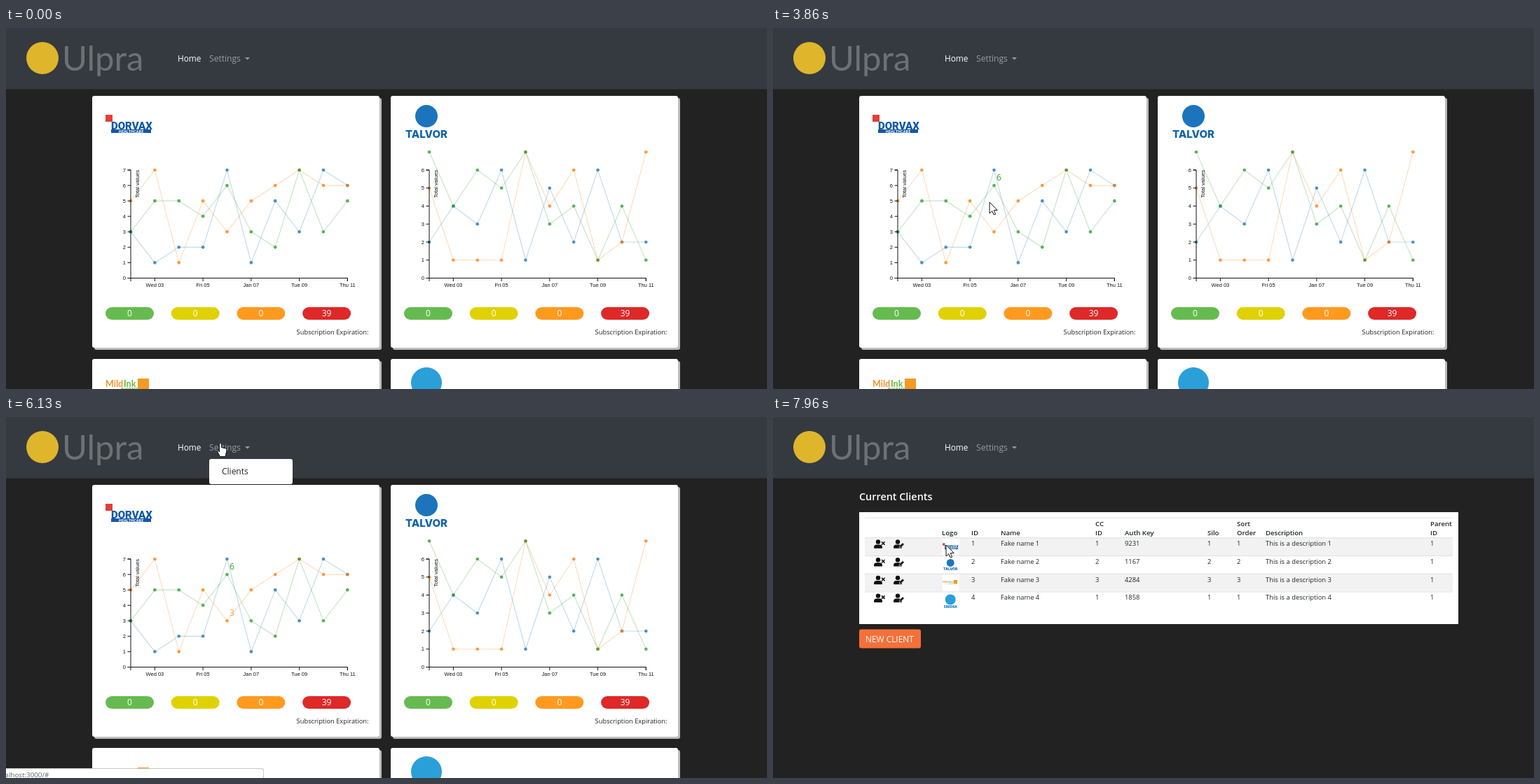
An HTML page with a canvas for the animation above (8 s loop, 1086 by 516 pixels).

```html
<!DOCTYPE html>
<html lang="en">
<head>
<meta charset="utf-8">
<title>Client dashboard</title>
<style>
html, body { margin: 0; width: 100%; height: 100%; overflow: hidden; background: #222; }
canvas { display: block; }
</style>
</head>
<body>
<canvas id="stage" width="1086" height="516"></canvas>
<script>
const ctx = document.getElementById('stage').getContext('2d');
const LOOP = 8000;
const UI = '"Open Sans", sans-serif';
const AXIS = '"Liberation Sans", Arial, sans-serif';
const COLORS = ['#1f77b4', '#ff7f0e', '#2ca02c'];
const DAYS = ['Wed 03', 'Fri 05', 'Jan 07', 'Tue 09', 'Thu 11'];
const PILLS = [['#66bb50', '0'], ['#e0d200', '0'], ['#ff9a1f', '0'], ['#df2828', '39']];

// One digit per day; series order matches COLORS
const CHARTS = [
  { x: 178, max: 7, series: ['3122715376', '5715356766', '3554632735'] },
  { x: 604, max: 6, series: ['2436152622', '5111746127', '7465734141'] }
];
const BASE = 357.5, TOP = 203, STEP = 34.37;

// Start, end, hovered series
const HOVERS = [[900, 1830, 0], [1950, 2700, 2], [2800, 3430, 2], [4400, 5530, 1]];
const VISIBLE = [[60, 900], [3430, 4400], [5530, LOOP]];
const PATH = [
  [60, 842, 2], [860, 321, 202], [3430, 314, 230], [3660, 309, 249], [3860, 309, 249],
  [4400, 314, 286], [5530, 315, 286], [5830, 307, 50], [5930, 306, 37], [6330, 306, 37],
  [6600, 334, 86], [7700, 334, 86], [7960, 247, 183], [LOOP, 247, 183]
];

const within = (t, a, b) => t >= a && t < b;
const bump = (t, a, b) => within(t, a, b) ? Math.sin(Math.PI * (t - a) / (b - a)) : 0;

function rect(x, y, w, h, fill, r = 0) {
  ctx.fillStyle = fill;
  ctx.beginPath();
  ctx.roundRect(x, y, w, h, r);
  ctx.fill();
}

function disc(x, y, r, fill) {
  ctx.fillStyle = fill;
  ctx.beginPath();
  ctx.arc(x, y, r, 0, 7);
  ctx.fill();
}

function text(str, x, y, size, fill, { weight = 400, align = 'left', family = UI } = {}) {
  ctx.font = `${weight} ${size}px ${family}`;
  ctx.textAlign = align;
  ctx.fillStyle = fill;
  ctx.fillText(str, x, y);
}

function poly(points, fill, stroke, width = 1) {
  ctx.beginPath();
  points.forEach(([x, y]) => ctx.lineTo(x, y));
  if (fill) {
    ctx.closePath();
    ctx.fillStyle = fill;
    ctx.fill();
  }
  if (stroke) {
    ctx.strokeStyle = stroke;
    ctx.lineWidth = width;
    ctx.stroke();
  }
}

function at(x, y, scale, draw) {
  ctx.save();
  ctx.translate(x, y);
  ctx.scale(scale, scale);
  draw();
  ctx.restore();
}

// Client logos, each about 66 wide
const LOGOS = [
  () => {
    rect(0, 0, 10, 10, '#e0403a');
    text('DORVAX', 8, 21, 15, '#1259a5', { weight: 900, family: 'Roboto, sans-serif' });
    rect(8, 21, 57, 5, '#1259a5');
    text('HEALTHCARE', 36.5, 25.6, 5.5, '#fff', { align: 'center', weight: 700 });
  },
  () => {
    disc(33, 16, 16, '#1c75bc');
    text('TALVOR', 33, 47, 15, '#0d64ae', { align: 'center', weight: 800, family: 'Inter, sans-serif' });
  },
  () => {
    text('Mild', 0, 13, 12.5, '#f0932b', { weight: 700, family: 'Lato, sans-serif' });
    text('Ink', 26, 13, 12.5, '#6db33f', { weight: 700, family: 'Lato, sans-serif' });
    rect(46, 1, 16, 16, '#f39a24');
    text('BUSINESS', 22, 18, 5, '#6db33f', { weight: 700 });
  },
  () => {
    disc(33, 22, 22, '#2a9fd8');
    text('SIMDRA', 33, 58, 14, '#1c84c6', { align: 'center', weight: 800 });
  }
];

function header() {
  rect(0, 0, 1086, 87.5, '#343a40');
  disc(52, 43, 23, '#dfb52c');
  text('Ulpra', 80, 60.5, 49, '#6d7175', { family: 'Lato, sans-serif' });
  text('Home', 245, 48, 11.8, '#fff', { weight: 500 });
  text('Settings', 290, 48, 12.1, '#999c9f');
  poly([[341, 42], [348, 42], [344.5, 45.5]], '#999c9f');
}

function card(x, y) {
  rect(x + 3, y + 3, 410, 360, '#bcbcbc', 3);
  rect(x, y, 410, 360, '#fff', 3);
}

function chart({ x, max, series }, t, main) {
  const hover = HOVERS.find(([a, b]) => within(t, a, b));
  const px = i => x + i * STEP;
  const py = v => BASE - v * (BASE - TOP) / max;
  const data = series.map(s => [...s].map(Number));

  data.forEach((row, k) => {
    const active = main && hover && hover[2] === k;
    ctx.globalAlpha = active ? 0.85 : hover ? 0.1 : 0.27;
    poly(row.map((v, i) => [px(i), py(v)]), null, COLORS[k], active ? 2 : 1.15);
  });

  ctx.globalAlpha = hover ? 0.25 : 0.78;
  data.forEach((row, k) => row.forEach((v, i) => {
    let r = 2.35;
    if (main && i === 4) {
      if (k === 2) r += 2.2 * bump(t, 1830, 2030);
      if (k === 1) r += 2.2 * bump(t, 4300, 4600);
    }
    disc(px(i), py(v), r, COLORS[k]);
  }));
  ctx.globalAlpha = 1;

  const right = x + 9 * STEP;
  poly([[x - 4.5, TOP], [x, TOP], [x, BASE], [x - 4.5, BASE]], null, '#111');
  poly([[x, BASE + 4.5], [x, BASE], [right, BASE], [right, BASE + 4.5]], null, '#111');
  for (let v = 0; v <= max; v++) {
    poly([[x - 4.5, py(v)], [x, py(v)]], null, '#111');
    text(v, x - 7, py(v) + 2.7, 7.5, '#111', { align: 'right', family: AXIS });
  }
  DAYS.forEach((day, i) => {
    const tx = px(2 * i + 1);
    poly([[tx, BASE], [tx, BASE + 4.5]], null, '#111');
    text(day, tx, 370, 7.5, '#111', { align: 'center', family: AXIS });
  });
  ctx.save();
  ctx.translate(x + 11.5, TOP);
  ctx.rotate(-Math.PI / 2);
  text('Total values', 0, 0, 7.6, '#111', { align: 'right', family: AXIS });
  ctx.restore();

  if (!main) return;
  if (within(t, 900, 1830)) text('Browser', 332.5, 207, 11.2, COLORS[0], { align: 'center' });
  if (t >= 1830) text('6', 319, 218, 12, COLORS[2]);
  if (t >= 4300) text('3', 319, 284, 12, '#ff9d48');
}

function dashboard(t) {
  CHARTS.forEach((c, n) => {
    const dx = n * 426;
    card(123 + dx, 97);
    card(123 + dx, 473);
    chart(c, t, n === 0);
    PILLS.forEach(([color, label], i) => {
      const x = 142 + dx + i * 93.7;
      rect(x, 399, 69, 18, color, 9);
      text(label, x + 34.5, 412.4, 12, '#fff', { align: 'center' });
    });
    text('Subscription Expiration:', 517.5 + dx, 438, 9.3, '#222', { align: 'right', weight: 500 });
  });
  at(142, 124, 1, LOGOS[0]);
  at(567, 110, 1, LOGOS[1]);
  at(142, 500, 1, LOGOS[2]);
  at(567, 485, 1, LOGOS[3]);
}

function person(x, y) {
  disc(x + 6, y + 3.2, 3.2, '#111');
  rect(x, y + 7.2, 12, 5.3, '#111', [4, 4, 1, 1]);
}

function clients(t) {
  text('Current Clients', 123, 118.5, 14.4, '#fff', { weight: 600 });
  rect(123, 136, 855, 160, '#fff');
  rect(131, 143.5, 839, 1, '#dee2e6');

  const head = [['Logo', 241], ['ID', 283], ['Name', 325], ['ID', 460], ['Auth Key', 502], ['Silo', 620],
    ['Order', 662], ['Description', 703], ['ID', 938], ['CC', 460, 156], ['Sort', 662, 156], ['Parent', 938, 156]];
  head.forEach(([s, x, y = 168.5]) => text(s, x, y, 9.6, '#212529', { weight: 600 }));

  const keys = [9231, 1167, 4284, 1858];
  const logoTop = [8, 5, 9, 4];
  keys.forEach((key, i) => {
    const n = i + 1, y = 172.3 + i * 25.7, group = i === 3 ? 1 : n;
    rect(131, y, 839, 25.7, i % 2 ? '#fff' : '#f2f2f2');
    rect(131, y, 839, 1, '#dee2e6');

    person(144, y + 3);
    poly([[155, y + 6], [159.5, y + 10.5]], null, '#111', 1.6);
    poly([[159.5, y + 6], [155, y + 10.5]], null, '#111', 1.6);
    person(172, y + 3);
    poly([[180, y + 15], [181, y + 11.5], [185, y + 7.5], [187.3, y + 9.8], [183, y + 14]], '#111', '#f2f2f2', 0.6);

    if (t >= 7160) {
      rect(241.5, y + 2, 24, 23, '#fff');
      at(242, y + logoTop[i], 0.34, LOGOS[i]);
    }
    const cells = [[n, 283], ['Fake name ' + n, 325], [group, 460], [key, 502], [group, 620],
      [group, 662], ['This is a description ' + n, 703], [1, 938]];
    cells.forEach(([s, x]) => text(s, x, y + 12, 9.4, '#212529'));
  });

  rect(123, 303.5, 88, 27, '#f4703a', 3);
  text('NEW CLIENT', 132, 321.5, 11.9, '#fff');
}

function menu() {
  rect(290, 60, 119, 36, '#fff', 3);
  text('Clients', 308, 82, 12, '#212529');
}

function statusBar(label) {
  rect(-4, 502, 372, 18, '#c4c7ca', 3);
  rect(-4, 503, 371, 18, '#fff', 3);
  text(label, -14.6, 515, 9.8, '#5f6368');
}

function arrow(x, y) {
  const shape = [[0, 0], [0, 16], [3.7, 12.6], [6.2, 18], [8.6, 17], [6.2, 11.6], [11.2, 11.4]];
  poly([...shape.map(([a, b]) => [x + a, y + b]), [x, y]], '#fff', '#111');
}

function hand(x, y) {
  ctx.beginPath();
  ctx.moveTo(x - 1.6, y + 13);
  ctx.lineTo(x - 1.6, y + 1.5);
  ctx.quadraticCurveTo(x, y - 1, x + 1.6, y + 1.5);
  ctx.lineTo(x + 1.6, y + 6.5);
  ctx.lineTo(x + 7.5, y + 8);
  ctx.quadraticCurveTo(x + 9.3, y + 8.6, x + 9, y + 11);
  ctx.lineTo(x + 7, y + 19.5);
  ctx.lineTo(x - 0.5, y + 19.5);
  ctx.lineTo(x - 4.6, y + 12);
  ctx.quadraticCurveTo(x - 4, y + 9.4, x - 1.6, y + 13);
  ctx.fillStyle = '#fff';
  ctx.fill();
  ctx.strokeStyle = '#111';
  ctx.lineWidth = 1;
  ctx.stroke();
}

function cursor(t) {
  if (!VISIBLE.some(([a, b]) => within(t, a, b))) return;
  const i = PATH.findIndex((p, k) => k && t < p[0]);
  const [t0, x0, y0] = PATH[i - 1], [t1, x1, y1] = PATH[i];
  const u = (t - t0) / (t1 - t0);
  // The short approach to the link runs straight through its waypoint
  const e = within(t, 5530, 5930) ? u : u * u * (3 - 2 * u);
  const x = x0 + (x1 - x0) * e, y = y0 + (y1 - y0) * e;
  (within(t, 5530, 7560) && y < 90 ? hand : arrow)(x, y);
}

function draw(t) {
  rect(0, 0, 1086, 516, '#222');
  header();
  t < 7100 ? dashboard(t) : clients(t);
  if (within(t, 6130, 6740)) menu();
  if (within(t, 6000, 7800)) statusBar(t < 6740 ? 'localhost:3000/#' : 'Waiting for localhost...');
  cursor(t);
}

const start = performance.now();
function tick() {
  draw((performance.now() - start) % LOOP);
  requestAnimationFrame(tick);
}
tick();
</script>
</body>
</html>
```
